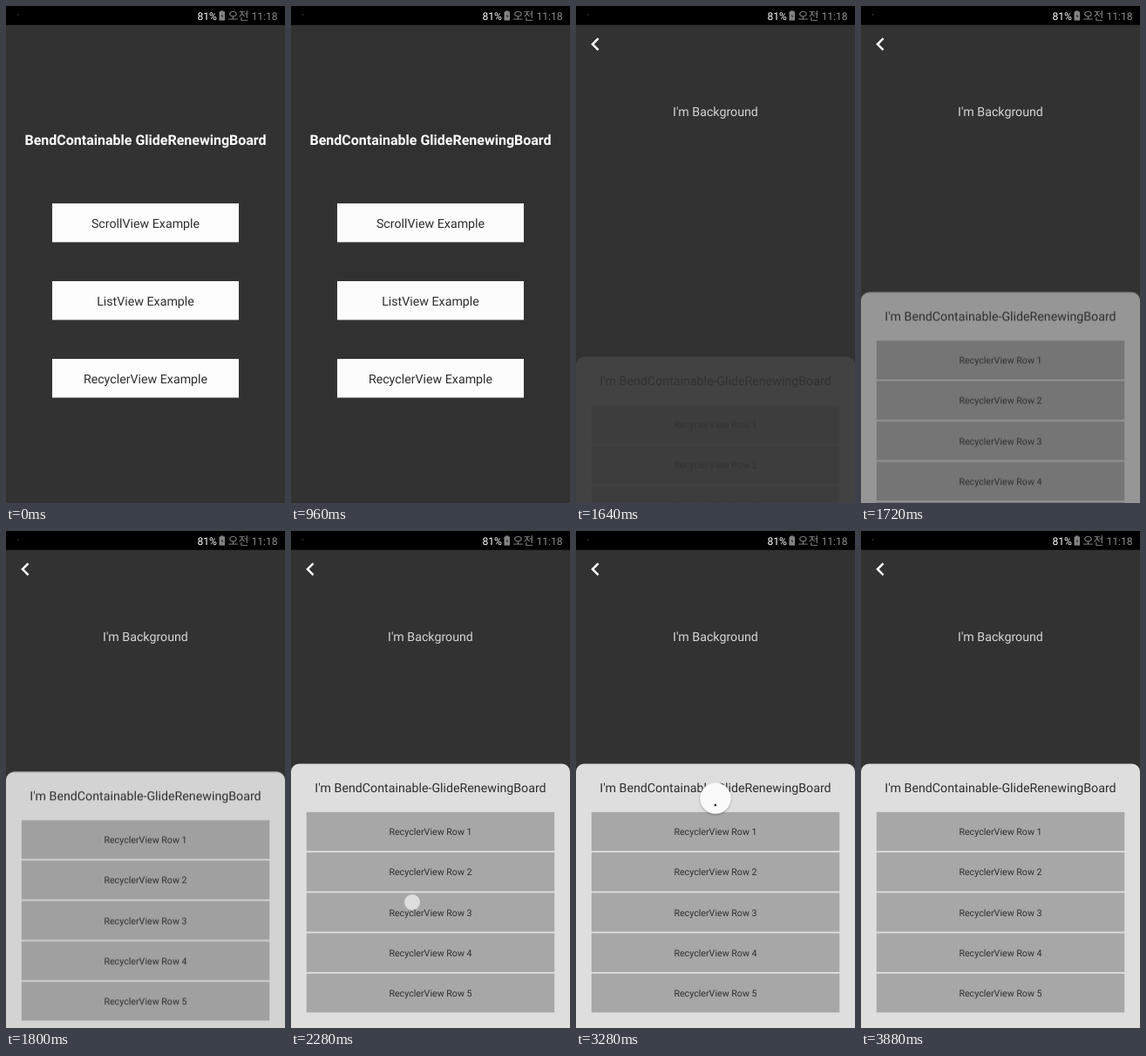
Animation, 320 px wide and 569 px high, one loop 6.56 s. Source, as an HTML page:

```html
<!DOCTYPE html>
<html lang="en">
<head>
<meta charset="utf-8">
<title>Pull to refresh</title>
<style>
  html, body { margin: 0; width: 100%; height: 100%; overflow: hidden; background: #000; }
  svg { display: block; width: 100%; height: 100%; }
  text { font: 14.22px Roboto, sans-serif; text-anchor: middle; fill: #2e2e2e; text-rendering: geometricPrecision; }
  .bg { fill: #323232; }
  .heading { font-size: 16px; font-weight: 700; fill: #fff; }
  .button { fill: #fdfdfd; }
  .light { fill: #d6d6d6; }
  .row { fill: #a7a7a7; }
  .row-label { font-size: 10.67px; }
  .status text { font-size: 12.1px; text-anchor: start; fill: #8c8c8c; }
  .status .battery-level { fill: #fff; }
  .status .meridiem { font: 300 13px "Noto Sans CJK KR", "Noto Sans CJK", sans-serif; }

  /* All parts share one 6560 ms timeline. */
  .home, .page, .sheet, .touch, .badge, .arc { animation: 6560ms linear infinite; }
  .home { animation-name: recede; }
  .page { animation-name: enter; }
  .sheet { animation-name: rise; }
  .touch { animation-name: drag; fill: #ececec; }
  .badge { animation-name: pull; }
  .badge .disc { fill: #fafafa; filter: drop-shadow(0 1px 1px rgba(0, 0, 0, .3)); }
  .arc { animation-name: spin; fill: none; stroke: #111; stroke-width: 2.2; }

  @keyframes recede {
    0%, 14.329% { transform: none; opacity: 1; animation-timing-function: cubic-bezier(.38, 0, .48, 1); }
    23.171%, 100% { transform: translateX(-7px); opacity: .88; }
  }
  @keyframes enter {
    0%, 14.329% { transform: translateX(320px); animation-timing-function: cubic-bezier(.38, 0, .48, 1); }
    23.171%, 100% { transform: none; }
  }
  @keyframes rise {
    0%, 24.6% { transform: translateY(151px); opacity: 0; }
    25% { transform: translateY(136px); opacity: .09; }
    26.22% { transform: translateY(62px); opacity: .58; }
    26.829% { transform: translateY(32px); opacity: .79; }
    27.439% { transform: translateY(9.5px); opacity: .94; }
    28.049%, 100% { transform: none; opacity: 1; }
  }
  @keyframes drag {
    0%, 34.7% { transform: translate(139px, 425px); opacity: 0; }
    34.701%, 34.9% { transform: translate(139px, 425px); opacity: .8; }
    39.634% { transform: translate(141px, 552.5px); opacity: .8; }
    40.8% { transform: translate(141px, 553px); opacity: .6; }
    40.801%, 100% { transform: translate(141px, 553px); opacity: 0; }
  }
  @keyframes pull {
    0%, 35.366% { transform: translate(160px, 278px) scale(0); }
    39.024%, 39.634% { transform: translate(160px, 308px) scale(1); }
    41.463%, 55.183% { transform: translate(160px, 306px) scale(1); }
    59.146%, 100% { transform: translate(160px, 306px) scale(0); }
  }
  @keyframes spin {
    0%, 35.366% { transform: rotate(130deg); stroke-dasharray: 0 360; }
    39.024%, 39.634% { transform: rotate(217deg); stroke-dasharray: 288 360; }
    50.305% { transform: rotate(819deg); stroke-dasharray: 10 360; }
    55.183%, 100% { transform: rotate(880deg); stroke-dasharray: 190 360; }
  }
</style>
</head>
<body>
<svg viewBox="0 0 320 569" preserveAspectRatio="none">
  <g class="home">
    <rect class="bg" y="21.5" width="340" height="548"/>
    <text class="heading" x="160" y="159">BendContainable GlideRenewingBoard</text>
    <g id="buttons"></g>
  </g>

  <g class="page">
    <rect class="bg" y="21.5" width="320" height="548"/>
    <path fill="#fff" transform="translate(7.2 28.7) scale(1.25)" d="M15.41 7.41 14 6l-6 6 6 6 1.41-1.41L10.83 12z"/>
    <text class="light" x="160" y="125.5">I'm Background</text>
    <g class="sheet">
      <path fill="#dedede" d="M0 570V275.5a9 9 0 0 1 9-9H311a9 9 0 0 1 9 9V570z"/>
      <text x="160" y="299">I'm BendContainable-GlideRenewingBoard</text>
      <g id="rows"></g>
    </g>
    <g class="badge">
      <circle class="disc" r="17.8"/>
      <circle class="arc" r="7.8" pathLength="360"/>
    </g>
    <circle class="touch" r="9"/>
  </g>

  <g class="status">
    <rect width="320" height="21.5"/>
    <circle cx="13.5" cy="10" r="1" fill="#2c2c2c"/>
    <text class="battery-level" x="219.5" y="16">81%</text>
    <path fill="#858585" d="M246 6.5V5.5h3.500v1h1.500v10h-6.500v-10z"/>
    <path fill="#333" d="M248.500 8.500l-2 3.500h1.500l-.5 2.500 2-3.500h-1.500z"/>
    <text class="meridiem" x="254.500" y="16">오전</text>
    <text x="281.500" y="16">11:18</text>
  </g>
</svg>
<script>
  function addBox(parent, boxClass, x, y, width, height, labelClass, label, baseline) {
    parent.insertAdjacentHTML("beforeend",
      `<rect class="${boxClass}" x="${x}" y="${y}" width="${width}" height="${height}"/>
       <text class="${labelClass}" x="160" y="${y + baseline}">${label}</text>`);
  }

  const buttons = document.getElementById("buttons");
  ["ScrollView", "ListView", "RecyclerView"].forEach((name, i) =>
    addBox(buttons, "button", 53, 226 + 89 * i, 214, 44.4, "", `${name} Example`, 27.5));

  const rows = document.getElementById("rows");
  for (let i = 0; i < 5; i++) {
    addBox(rows, "row", 17.8, 321.8 + 46.25 * i, 284.4, 44.4, "row-label", `RecyclerView Row ${i + 1}`, 26.2);
  }
</script>
</body>
</html>
```
